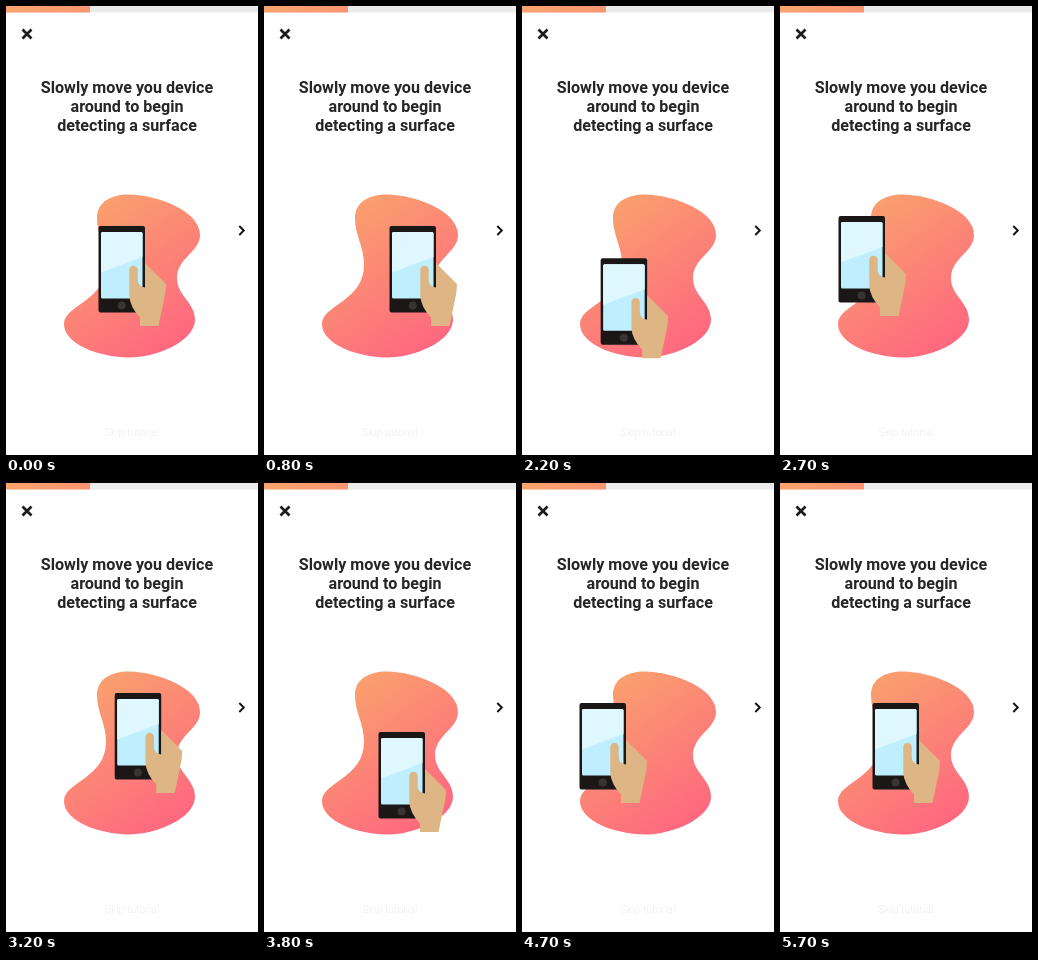
Recreate the animation shown at these times as an HTML page. Size 252 by 449 pixels, loop 5800 ms.

```html
<!DOCTYPE html>
<html lang="en">
<head>
<meta charset="utf-8">
<style>
  html, body { margin: 0; width: 100%; height: 100%; overflow: hidden; background: #fff; }
  svg { display: block; width: 252px; height: 449px; }
  text { font-family: Roboto, sans-serif; text-anchor: middle; }
  .title { font-size: 16.1px; font-weight: 700; fill: #262626; }
  .skip { font-size: 10.6px; font-weight: 300; fill: #ececec; }
</style>
</head>
<body>
<svg viewBox="0 0 252 449">
  <defs>
    <linearGradient id="warm" x1="0.15" y1="0" x2="0.75" y2="1">
      <stop offset="0" stop-color="#f9a56c"/>
      <stop offset="1" stop-color="#ff6680"/>
    </linearGradient>
    <linearGradient id="bar">
      <stop offset="0" stop-color="#faa46d"/>
      <stop offset="1" stop-color="#fb9571"/>
    </linearGradient>
  </defs>

  <rect width="252" height="6.5" fill="#ebebeb"/>
  <rect width="84" height="6.5" fill="url(#bar)"/>
  <path d="M16.5 23.5l9 9m0-9l-9 9" stroke="#1c1c1c" stroke-width="2.7"/>
  <path d="M233.3 220l4.5 4.5-4.5 4.5" fill="none" stroke="#111" stroke-width="1.9"/>

  <g class="title">
    <text x="121" y="87">Slowly move you device</text>
    <text x="121" y="106">around to begin</text>
    <text x="121" y="125">detecting a surface</text>
  </g>
  <text class="skip" x="126" y="430">Skip tutorial</text>

  <path fill="url(#warm)" d="M91 212C91 196 105 188.5 123 188.5C152 189 194 205 194 229C194 246 171 252 171 272
    C171 290 189 296 189 314C188 336 150 351.5 123 351.5C92 351 58 338 58 318C58 299 100 295 100 259C100 240 91 230 91 212Z"/>

  <g id="phone">
    <rect x=".5" width="46.5" height="86.5" rx="2" fill="#1b1717"/>
    <rect x="3" y="6" width="41.5" height="66.5" rx="1.5" fill="#bfeffe"/>
    <path d="M3 7.5Q3 6 4.5 6H43Q44.5 6 44.5 7.5V31L3 46.5Z" fill="#dff7ff"/>
    <circle cx="23.7" cy="79.5" r="4" fill="#393434"/>
    <path fill="#deb584" d="M31.3 44a4.2 4.2 0 0 1 8.4 0V54Q40 61 47 61.5V37L68 58Q68 66 65.5 76L60.5 100H42V91.5Q32 81 31.3 70Z"/>
  </g>
</svg>
<script>
const LOOP = 5800, STEP = 100;
const phone = document.getElementById('phone');

// [time, x, y] of the phone's top left corner
const path = [
  [0, 92, 220], [800, 125, 220], [1200, 129, 231], [1700, 119, 245],
  [2100, 86, 255.5], [2400, 65, 238], [2700, 58, 210], [3000, 84, 206],
  [3300, 118, 214], [3600, 127, 233], [3800, 114, 249], [4000, 95, 255.5],
  [4300, 70, 247], [4700, 57, 220], [5200, 76, 219], [5700, 92, 220], [5800, 92, 220]
];

function slope(i, k) {
  if (i === 0 || i >= path.length - 2) return 0;
  const a = path[i - 1], b = path[i + 1];
  return (b[k] - a[k]) / (b[0] - a[0]);
}

// Cubic Hermite curve through the path points
function place(t, k) {
  const i = path.findIndex((p, n) => n === path.length - 2 || t < path[n + 1][0]);
  const a = path[i], b = path[i + 1], span = b[0] - a[0];
  const s = (t - a[0]) / span, r = 1 - s;
  return a[k] * r * r * (1 + 2 * s) + b[k] * s * s * (1 + 2 * r)
    + span * s * r * (slope(i, k) * r - slope(i + 1, k) * s);
}

const start = performance.now();
function draw() {
  const t = Math.floor(((performance.now() - start) % LOOP) / STEP) * STEP;
  phone.setAttribute('transform', `translate(${place(t, 1)} ${place(t, 2)})`);
  requestAnimationFrame(draw);
}
draw();
</script>
</body>
</html>
```
